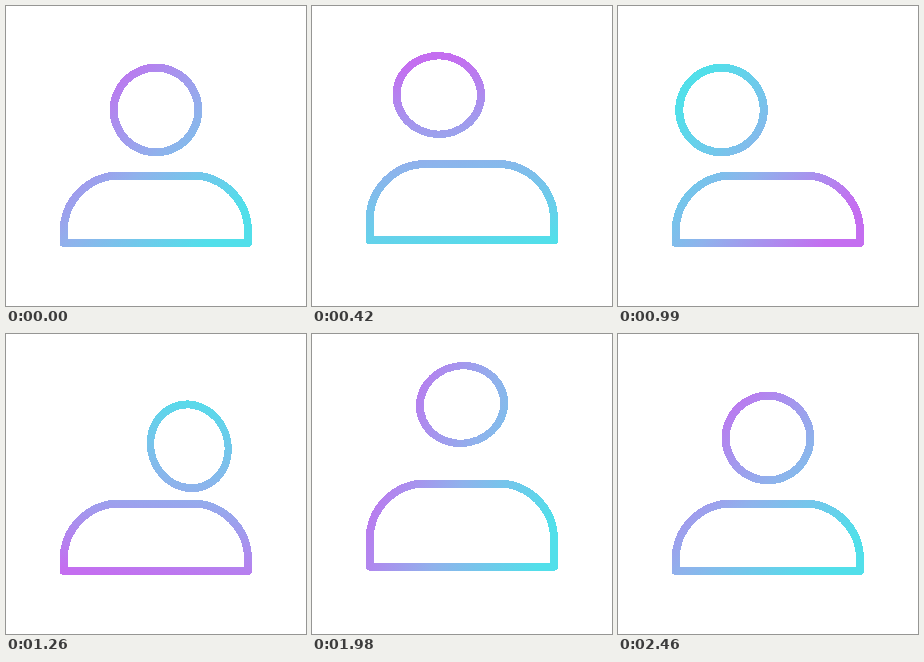
An HTML page that plays this animation: 300 px wide and 300 px high, repeating every 4.52 s.

```html
<!DOCTYPE html>
<html lang="en">
<head>
<meta charset="utf-8">
<title>Person icon</title>
<style>
  html, body { margin: 0; width: 100%; height: 100%; overflow: hidden; background: #fff; }
  svg { display: block; width: 100vw; height: 100vh; }
</style>
</head>
<body>
<svg viewBox="0 0 300 300" shape-rendering="crispEdges">
  <defs>
    <linearGradient id="tint" gradientUnits="userSpaceOnUse" x1="52" y1="150" x2="248" y2="150">
      <stop offset="0" stop-color="#c46ef0"/>
      <stop offset=".5" stop-color="#8fb2ec"/>
      <stop offset="1" stop-color="#52dfea"/>
    </linearGradient>
  </defs>
  <path id="body" fill="none" stroke="url(#tint)" stroke-width="8" stroke-linejoin="round"/>
  <path id="head" fill="url(#tint)" fill-rule="evenodd"/>
</svg>
<script>
const LOOP = 4520, STEP = 30, ACTIVE = 2460;
const tint = document.getElementById('tint');
const body = document.getElementById('body');
const head = document.getElementById('head');

const smooth = u => u * u * (3 - 2 * u);
const ease = (t, from, to) => smooth(Math.min(1, Math.max(0, (t - from) / (to - from))));
// Rises from a to b, holds, falls from c to d
const swell = (t, a, b, c, d) => ease(t, a, b) - ease(t, c, d);

function ellipse(x, y, rx, ry, tilt) {
  const a = tilt * Math.PI / 180;
  const dx = rx * Math.cos(a), dy = rx * Math.sin(a);
  const arc = `A${rx} ${ry} ${tilt} 0 1`;
  return `M${x - dx} ${y - dy}${arc} ${x + dx} ${y + dy}${arc} ${x - dx} ${y - dy}Z`;
}

// One full turn, fastest a little before the middle
function turn(t) {
  const p = Math.min(1, t / ACTIVE);
  return 45 + 360 * smooth(p + 0.09 * Math.sin(Math.PI * p) ** 2);
}

function draw(t) {
  const hopOut = swell(t, 0, 240, 270, 540);
  const hopBack = swell(t, 1770, 1980, 2130, 2430);
  const dipLeft = swell(t, 510, 600, 600, 780);
  const dipRight = swell(t, 1110, 1260, 1260, 1400);
  const dip = dipLeft + dipRight;

  // The head goes left, across to the right, then home
  const x = 150 - 46.5 * ease(t, 270, 570) + 82.5 * ease(t, 1080, 1270)
    - 36 * ease(t, 1770, 1980) - 2 * dip;
  const y = 104 - 36 * hopOut - 33.5 * hopBack + 8.3 * dip;
  const sx = 1 - 0.09 * dip;
  const sy = 1 - 0.17 * hopOut - 0.085 * hopBack;
  const tilt = 7 * hopOut - 12 * hopBack - 4 * dipLeft - 20 * dipRight;
  const ring = r => ellipse(x, y, r * sx, r * sy, tilt);
  head.setAttribute('d', ring(46.3) + ring(38.3));

  const lift = 27.5 * hopOut + 20 * hopBack;
  const top = 169.5 - lift, base = 237 - lift * 0.22, r = 56;
  body.setAttribute('d',
    `M57.7 ${base}V${top + r}a${r} ${r} 0 0 1 ${r} ${-r}H186a${r} ${r} 0 0 1 ${r} ${r}V${base}Z`);

  tint.setAttribute('gradientTransform', `rotate(${turn(t)} 150 150)`);
}

const start = performance.now();
function tick() {
  const t = (performance.now() - start) % LOOP;
  draw(Math.floor(t / STEP) * STEP);
  requestAnimationFrame(tick);
}
tick();
</script>
</body>
</html>
```
